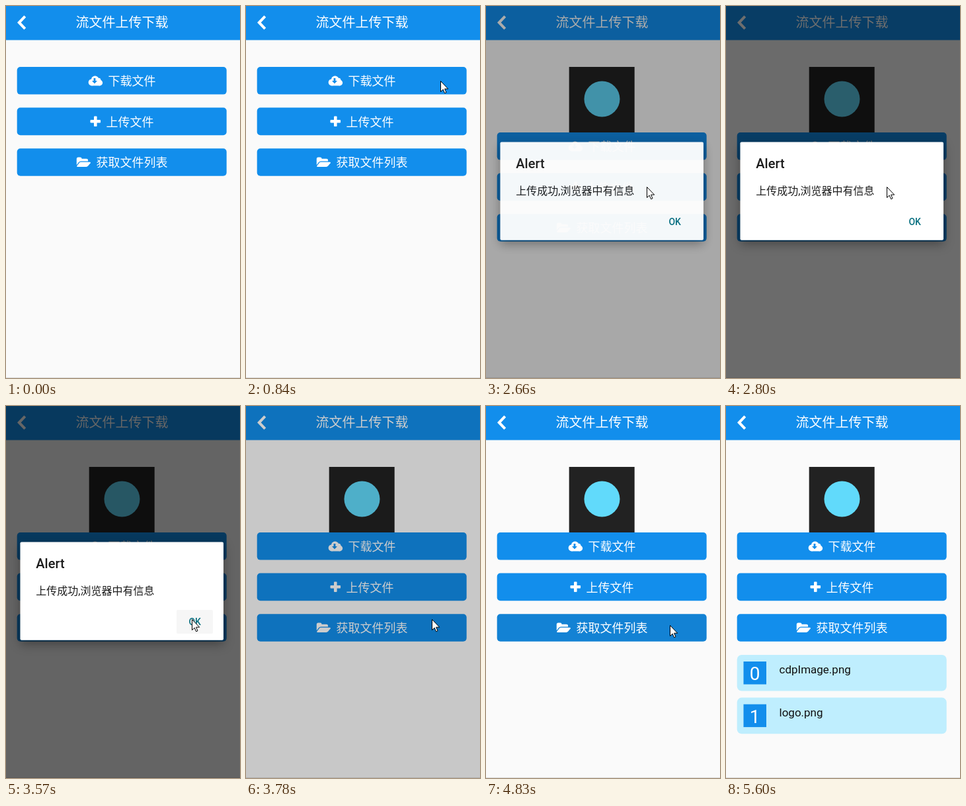
Recreate the animation shown at these times as an HTML page. Size 354 by 562 pixels, loop 6160 ms.

```html
<!DOCTYPE html>
<html lang="zh-CN">
<head>
<meta charset="utf-8">
<title>流文件上传下载</title>
<style>
  html, body { margin: 0; width: 100%; height: 100%; overflow: hidden; background: #fafafa; }
  svg { display: block; width: 354px; height: 562px; }
  text { font-family: Roboto, "Noto Sans CJK SC", "Noto Sans CJK", sans-serif; }

  .anim { animation: 6160ms step-end infinite; }
  .label { font-size: 18px; fill: #fff; }
  .icon { fill: #fff; }
  .button { --face: #128eec; }
  .button > rect, .hole { fill: var(--face); }
  .file { font-size: 17px; fill: #111; }
  .index { font-size: 28px; fill: #fff; text-anchor: middle; }
  .medium { font-weight: 500; }
  .card { filter: drop-shadow(0 6px 8px rgba(0, 0, 0, .35)); }

  #photo { animation-name: photo; }
  #stack { animation-name: stack; }
  #download { animation-name: download; }
  #list-button { animation-name: list-button; }
  #files { animation-name: files; }
  #dim { animation-name: dim; }
  #dialog { animation-name: dialog; }
  #ripple { animation-name: ripple; }
  #cursor { animation-name: cursor; }

  @keyframes photo { 0% { opacity: 0 } 21.59%, 100% { opacity: 1 } }
  @keyframes stack { 0% { transform: none } 21.59%, 100% { transform: translateY(99px) } }
  @keyframes download {
    0%, 13.63%, 100% { --face: #128eec }
    12.49% { --face: #1382d4 }
  }
  @keyframes list-button {
    0%, 80.68%, 100% { --face: #128eec }
    78.4% { --face: #1382d4 }
  }
  @keyframes files { 0% { opacity: 0 } 80.68%, 100% { opacity: 1 } }
  @keyframes dim {
    0% { opacity: 0 }
    42.04% { opacity: .15 }
    43.18% { opacity: .33 }
    44.31% { opacity: .48 }
    45.45% { opacity: .57 }
    46.59% { opacity: .6 }
    59.09% { opacity: .5 }
    60.22% { opacity: .35 }
    61.36% { opacity: .2 }
    62.49%, 100% { opacity: 0 }
  }
  @keyframes dialog {
    0% { opacity: 0 }
    42.04% { opacity: .6 }
    43.18% { opacity: .96 }
    44.31% { opacity: 1 }
    59.09% { opacity: .65 }
    60.22% { opacity: .15 }
    61.36%, 100% { opacity: 0 }
  }
  @keyframes ripple {
    0% { clip-path: circle(0 at 23px 24px) }
    54.54% { clip-path: circle(22px at 23px 24px) }
    56.81%, 100% { clip-path: circle(60px at 23px 24px) }
  }
  @keyframes cursor {
    0% { opacity: 0; transform: translate(338px, 102px) }
    5.68% { opacity: 1; transform: translate(338px, 102px) }
    6.81% { opacity: 1; transform: translate(312px, 109px) }
    7.95% { opacity: 1; transform: translate(294px, 113px) }
    24.99% { opacity: 1; transform: translate(290px, 127px) }
    26.13% { opacity: 1; transform: translate(276px, 166px) }
    27.27% { opacity: 1; transform: translate(260px, 214px) }
    28.4% { opacity: 1; transform: translate(250px, 249px) }
    29.54% { opacity: 1; transform: translate(246px, 263px) }
    32.95% { opacity: 1; transform: translate(244px, 269px) }
    34.09% { opacity: 1; transform: translate(243px, 273px) }
    47.72% { opacity: 1; transform: translate(248px, 282px) }
    48.86% { opacity: 1; transform: translate(260px, 301px) }
    49.99% { opacity: 1; transform: translate(273px, 317px) }
    51.13% { opacity: 1; transform: translate(279px, 322px) }
    52.27% { opacity: 1; transform: translate(281px, 322px) }
    67.04% { opacity: 1; transform: translate(280px, 327px) }
    68.18% { opacity: 1; transform: translate(278px, 331px) }
    86.36% { opacity: 1; transform: translate(277px, 350px) }
    87.49% { opacity: 1; transform: translate(275px, 400px) }
    88.63% { opacity: 1; transform: translate(272px, 460px) }
    89.77% { opacity: 1; transform: translate(270px, 513px) }
    90.9%, 100% { opacity: 0; transform: translate(270px, 513px) }
  }
</style>
</head>
<body>
<svg viewBox="0 0 354 562">
  <rect width="354" height="562" fill="#fafafa"/>
  <rect y="561" width="354" height="1" fill="#dcdcdc"/>

  <rect width="354" height="51.5" fill="#128eec"/>
  <path d="M28.8 15.6 19.8 25 28.8 34.4" fill="none" stroke="#fff" stroke-width="4"/>
  <text x="105.5" y="32" font-size="20" fill="#fff">流文件上传下载</text>

  <g id="photo" class="anim">
    <rect x="125.7" y="92" width="99" height="99" fill="#222"/>
    <circle cx="175.5" cy="140.5" r="27" fill="#61dafb"/>
  </g>

  <g id="stack" class="anim">
    <g id="download" class="button anim">
      <rect x="16.7" y="92" width="317" height="41.6" rx="5"/>
      <g class="icon" transform="translate(124.7 105.6)">
        <circle cx="5" cy="9.8" r="5"/>
        <circle cx="10" cy="5.7" r="5.7"/>
        <circle cx="15.7" cy="6" r="2.9"/>
        <circle cx="17.1" cy="10.4" r="4.4"/>
        <path d="M5 6H17.1V14.8H5z"/>
        <path class="hole" d="M7.9 3.3h2.8v4.2h2.6L9.3 11.7 5.3 7.5h2.6z"/>
      </g>
      <text class="label" x="154.5" y="120">下载文件</text>
    </g>

    <g class="button">
      <rect x="16.7" y="153.6" width="317" height="41.6" rx="5"/>
      <g class="icon" transform="translate(127.5 166.4)">
        <rect y="5.5" width="15.6" height="4.6" rx="1"/>
        <rect x="5.5" width="4.6" height="15.6" rx="1"/>
      </g>
      <text class="label" x="151.5" y="181.5">上传文件</text>
    </g>

    <g id="list-button" class="button anim">
      <rect x="16.7" y="215.2" width="317" height="41.6" rx="5"/>
      <g class="icon" transform="translate(106.8 228.6)">
        <path d="M0 11.6V2.5Q0 0 2.5 0H5.4Q7.8 0 7.8 2.2H15Q17.3 2.2 17.3 4.5V6H6.4Q4.3 6 3 7.7z"/>
        <path d="M6 7.1H20.3q1.3.3.6 1.5L17.2 13.2q-1 1.1-2.5 1.1H1q-1-.2-.4-1.3L4.1 8.3Q5 7.1 6 7.1z"/>
      </g>
      <text class="label" x="136.5" y="243">获取文件列表</text>
    </g>
  </g>

  <g id="files" class="anim">
    <rect x="16.7" y="376" width="317" height="54.6" rx="7" fill="#bfeefe"/>
    <rect x="26.5" y="386" width="34.5" height="34.5" fill="#128eec"/>
    <text class="index" x="43.7" y="414">0</text>
    <text class="file" x="80.5" y="404">cdpImage.png</text>
    <rect x="16.7" y="440.6" width="317" height="54.6" rx="7" fill="#bfeefe"/>
    <rect x="26.5" y="450.6" width="34.5" height="34.5" fill="#128eec"/>
    <text class="index" x="43.7" y="479">1</text>
    <text class="file" x="80.5" y="468.6">logo.png</text>
  </g>

  <rect id="dim" class="anim" width="354" height="562"/>

  <g id="dialog" class="anim">
    <rect class="card" x="21.5" y="205.5" width="307.5" height="148.3" rx="2" fill="#fff"/>
    <text class="medium" x="45.3" y="245" font-size="20" fill="#1c1c1c">Alert</text>
    <text x="45.3" y="285" font-size="16" fill="#1c1c1c">上传成功,浏览器中有信息</text>
    <g transform="translate(258 308)">
      <rect id="ripple" class="anim" width="55" height="36" rx="2" fill="#f6f6f6"/>
    </g>
    <text class="medium" x="276.4" y="331" font-size="14" fill="#087080">OK</text>
  </g>

  <path id="cursor" class="anim" d="M.5.5V16.5L4.2 13.1 6.6 18.7 9 17.7 6.6 12.2H11.7z" fill="#fff" stroke="#000"/>
</svg>
</body>
</html>
```
